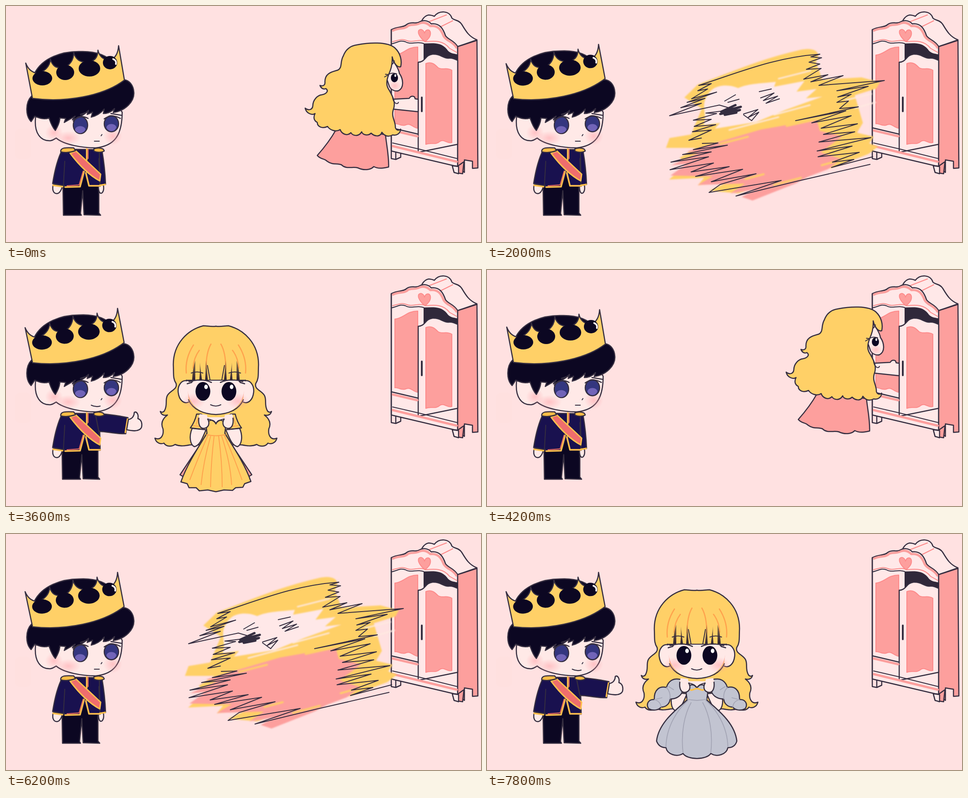
An HTML page that plays this animation: 1059x529 px, repeating every 8000 ms.

```html
<!DOCTYPE html>
<html lang="en">
<head>
<meta charset="utf-8">
<title>Wardrobe change</title>
<style>
html, body { margin: 0; width: 100%; height: 100%; overflow: hidden; background: #ffe1e1 }
svg { display: block; width: 100vw; height: 100vh; fill: none; stroke-linecap: round; stroke-linejoin: round }
.line { stroke: #352e40; stroke-width: 2.5 }
.thin { stroke: #352e40; stroke-width: 2 }
.ink { fill: #0c0722 }
.gold { fill: #ffd067 }
.pink { fill: #fd9f9d }
.skin { fill: #ffe9e7 }
.cream { fill: #ffe8e8 }
.navy { fill: #19114f }
.silver { fill: #c2c4d1 }
.trim { stroke: #fd9f9d; stroke-width: 5 }
.rim { stroke: #fd8a8a; stroke-width: 2 }
.braid { stroke: #ffc04c; stroke-width: 3.5 }
.fold { stroke: #ffa24d; stroke-width: 2 }
.crease { stroke: #a3a4b4; stroke-width: 1.8 }
.blush { fill: url(#blush) }
.soft { filter: blur(1.5px) }
</style>
</head>
<body>
<svg viewBox="0 0 1059 529" preserveAspectRatio="none">
<defs>
  <radialGradient id="blush">
    <stop offset="0" stop-color="#ff9aa2" stop-opacity=".5"/>
    <stop offset="1" stop-color="#ff9aa2" stop-opacity="0"/>
  </radialGradient>
  <linearGradient id="tip" x1="0" y1="0" x2="0" y2="1">
    <stop offset="0" stop-color="#2c2030" stop-opacity=".5"/>
    <stop offset="1" stop-color="#2c2030"/>
  </linearGradient>

  <g id="curls">
    <path class="gold line" d="M468 126C458 128 449 125 440 125C405 134 373 165 373 212C374 235 372 243 379 254C384 268 363 271 359 283C355 294 360 302 354 314C352 319 347 320 344 317C346 325 353 327 360 325C348 334 345 345 350 356C352 368 347 383 332 377C335 389 346 391 352 388C358 397 370 396 377 391C388 396 400 394 410 392L468 392"/>
  </g>
  <g id="arm">
    <path class="skin line" d="M415 355C407 374 411 392 420 396C433 393 438 376 446 358Z"/>
  </g>
  <g id="hand">
    <path class="skin line" d="M430 331C428 347 433 356 442 355C453 353 455 342 449 333"/>
    <path class="skin" d="M429 331L450 334L448 325L432 323Z"/>
  </g>
  <g id="ear">
    <path class="skin line" d="M406 249C391 244 382 260 384 275C386 292 397 301 407 296"/>
    <path stroke="#fb9a94" stroke-width="2" d="M407 262Q405 277 410 290"/>
  </g>
  <g id="goldSleeve">
    <path class="gold line" d="M425 323C422 336 417 346 411 354L438 357L446 330L435 323Z"/>
    <path class="fold" d="M418 349L438 351M429 330L424 346"/>
  </g>
  <g id="puff">
    <path class="silver line" d="M431 326C415 322 404 330 400 344C385 340 372 349 373 371C360 370 354 381 360 391C371 398 384 394 388 388C401 388 408 378 408 370C425 370 435 360 436 350Z"/>
    <path class="crease" d="M400 344Q410 354 408 370M373 371Q387 375 388 388M405 342L416 349M378 370L390 367"/>
  </g>
  <g id="eye">
    <ellipse class="blush" cx="419" cy="294" rx="25" ry="18"/>
    <ellipse class="ink" cx="439" cy="272" rx="16.5" ry="21"/>
    <path class="line" d="M408 250Q437 242 458 252M402 247L416 250M404 255L414 252"/>
  </g>
  <g id="bangs">
    <path stroke="#ffa24d" stroke-width="2.6" d="M418 168C404 190 400 212 402 231M431 180C422 192 418 205 417 220M457 166C450 178 446 197 446 222"/>
    <path fill="url(#tip)" d="M415 247Q416 220 422 203L422 247ZM431 247Q433 222 432 207L437 247ZM444 247L446 203L450 247Z"/>
    <path class="thin" d="M413 231Q426 226 439 231M455 247L449 214"/>
  </g>
</defs>

<rect width="1059" height="529" fill="#ffe1e1"/>
<rect x="20" y="275" width="36" height="68" rx="12" fill="#ffdcd9" opacity=".35"/>

<g id="wardrobe">
  <path class="cream line" d="M928 31C938 16 947 20 955 23C966 9 989 10 994 27C999 33 1009 30 1016 41C1026 58 1033 69 1050 76L1007 91L925 40Z"/>
  <path class="rim" d="M941 36L982 20M968 47L996 33"/>
  <path class="cream line" d="M859 53C874 45 886 49 894 41C903 34 913 41 921 36C931 30 942 33 948 40C966 38 974 49 980 67C986 76 998 76 1007 91V360L859 325Z"/>
  <path class="trim" d="M863 55C875 48 889 53 897 44C907 40 914 44 922 39C932 35 940 39 946 45C963 43 970 53 976 68C984 80 996 79 1004 93"/>
  <path class="pink line" d="M1007 91L1050 77L1052 363L1040 364V348L1022 345V373L1007 361Z"/>
  <path class="pink rim" d="M867 110C887 108 893 92 918 92V274C906 272 902 261 890 267C879 270 874 262 867 264Z"/>
  <path class="thin" d="M859 85C874 82 878 76 890 80C902 88 916 78 931 84"/>
  <path fill="#30283a" d="M931 84C950 84 969 80 983 97C990 108 1000 106 1007 109V124H931Z"/>
  <path class="rim" d="M862 80C875 77 881 73 892 77C905 84 921 72 936 80C957 78 975 77 989 95L1005 104"/>
  <path class="cream line" d="M919 126C935 126 934 110 951 108C969 107 973 117 986 117C995 116 1001 119 1007 122V310L919 328Z"/>
  <path class="pink rim" d="M936 129C949 124 956 131 963 138C973 145 981 136 994 144V306C982 309 978 298 968 303C957 313 948 305 936 310Z"/>
  <path stroke="#352e40" stroke-width="4" d="M927 205V236"/>
  <path class="line" d="M859 273L918 287"/>
  <path class="trim" d="M862 279L917 292M862 314L1005 349"/>
  <path class="thin" d="M862 307L918 320L938 325M938 325L1006 342"/>
  <path class="line" d="M859 53V342L869 344V328M880 331V339L869 344"/>
  <path class="pink line" d="M995 358L999 373L1018 376L1021 349L1007 359Z"/>
  <path class="cream line" d="M995 358L999 373L1009 376V360Z"/>
  <path class="pink rim" d="M934 80C925 73 917 62 920 55C925 49 932 55 933 61C936 51 944 52 946 58C948 67 941 75 934 80Z"/>
</g>

<g id="peek">
  <path class="pink line" d="M736 277C722 302 709 318 694 335C701 344 709 341 716 348C728 357 739 352 748 356C759 367 774 359 785 363C798 369 812 368 820 360C831 366 844 363 853 361C854 336 848 310 846 288Z"/>
  <path id="reachLow" class="skin line" d="M862 209L899 207C903 200 912 201 912 208L919 209V237L862 231"/>
  <path id="reachHigh" class="skin line" d="M864 205C882 198 896 195 896 184C899 178 905 183 908 182Q914 178 919 184V212L865 236"/>
  <path class="skin line" d="M858 115C868 130 876 142 877 151C886 164 888 183 875 190C867 192 859 188 855 181L845 152Z"/>
  <ellipse class="blush" cx="867" cy="179" rx="14" ry="12"/>
  <path class="gold line" d="M783 87C808 82 850 79 867 94C880 106 883 123 880 136C872 139 864 127 861 114C862 133 857 145 853 154C848 168 847 178 854 188C865 207 869 219 863 234C859 250 869 259 868 272C870 279 875 280 880 276C879 286 871 291 862 289C851 295 843 290 838 283C834 295 821 292 814 285C807 292 795 289 793 282C786 294 773 291 769 284C760 293 748 286 745 277C735 284 721 277 717 270C704 276 694 270 694 261C686 257 685 249 689 241C682 246 669 240 667 229C674 235 683 233 684 224C684 210 695 200 704 199C715 197 720 190 713 185C708 188 702 184 700 178C708 181 712 176 711 170C711 151 725 148 739 144C751 139 744 125 752 112C757 98 768 89 783 87Z"/>
  <ellipse class="ink" cx="866" cy="161" rx="8" ry="10"/>
  <ellipse cx="868" cy="156" rx="2" ry="3" fill="#fff"/>
  <path class="thin" d="M844 159L851 155Q859 148 871 152M846 153L853 154M862 130L866 123M862 205C863 216 872 223 875 216"/>
</g>

<g id="blur">
  <g class="soft">
    <path class="gold" d="M470 176C550 145 620 116 700 98C738 91 745 109 733 126L748 165L835 160L876 171L868 185L820 200L838 262L825 284L862 293L852 308L872 315L850 332L772 362L660 388L560 420L495 414L535 396L470 402L484 385L406 389L445 355L430 340L465 318L399 318L407 296L455 288L479 230L440 205Z"/>
    <path class="pink" d="M446 326L515 305L610 277L735 255L742 280L792 292L744 328L790 343L760 366L715 383L690 397L592 436L568 428L600 411L543 420L575 398L470 401L503 382L409 380L445 354L411 357L470 330Z"/>
    <path class="cream" d="M490 203C505 170 545 177 560 184C582 174 605 174 644 170L640 181L708 168L690 192L735 186L711 207L748 203L665 233L600 260L508 275L520 262L483 267C492 243 476 225 490 203Z"/>
    <path stroke="#ffe9e0" stroke-width="3" d="M540 278L650 249M640 244L720 222M650 163L721 145M800 211L857 197M820 229L866 216"/>
    <path stroke="#ffd067" stroke-width="4" d="M520 309L582 293M576 388L617 377M668 269L731 255M640 401L700 385M746 357L782 347"/>
  </g>
  <path class="thin" d="M742 108C640 115 560 150 472 178L500 174L470 190L492 186L456 208L512 193L446 216L486 207L432 228L478 218L407 246L518 222L552 232L488 240L512 241L460 256L500 254L462 270L510 266L458 282L500 278L450 301L478 296"/>
  <path class="thin" d="M742 108L722 114L746 116L718 126L742 130L712 142L745 140L706 164L760 154L722 170L794 156L740 178L886 167L780 190L850 180L782 204L812 198L780 216L806 213L786 230L828 226L688 257L800 235L724 262L812 246L745 274L826 264L750 288L820 282L740 305L856 295L736 325L814 314L738 338L830 328L770 350L818 344L768 362L860 338"/>
  <path class="thin" d="M480 308L515 307L460 322L536 312L436 333L500 327L410 350L494 338L408 367L505 352L455 372L540 360L465 382L570 366L500 394L600 376L520 400L495 418L656 391L555 426L690 393L854 355"/>
  <path class="thin" d="M607 192L634 186M610 206L640 195L616 212L648 202L622 218L652 208M572 242L604 232L582 250L606 238L590 257L572 244M530 213L554 199M537 216L562 209"/>
  <path stroke="#352e40" stroke-width="5" d="M554 222L522 237L566 226L520 242L564 233L530 244L556 239"/>
</g>

<g id="princess">
  <use href="#curls"/>
  <use href="#curls" transform="matrix(-1 0 0 1 936 0)"/>
  <path class="gold" d="M462 128H474V394H462Z"/>
  <path class="skin" d="M443 330H493V360H443Z"/>
  <use href="#arm"/>
  <use href="#arm" transform="matrix(-1 0 0 1 936 0)"/>
  <g id="goldDress">
    <path class="pink line" d="M445 373L388 459L402 467L468 400L534 467L548 459L491 373Z"/>
    <path class="gold line" d="M446 346C451 335 463 333 468 345C473 333 485 335 490 346L488 366C507 397 533 436 546 474L532 479L528 487L512 488L505 494L486 493L468 497L450 493L431 495L424 488L408 488L404 479L390 475C403 437 429 397 448 366Z"/>
    <path class="fold" d="M450 371Q427 424 410 470M456 373Q440 430 435 481M464 372Q457 430 456 486M474 372Q482 430 482 486M481 373Q500 430 503 481M487 371Q510 424 526 470M447 369Q468 374 489 369"/>
    <use href="#goldSleeve"/>
    <use href="#goldSleeve" transform="matrix(-1 0 0 1 936 0)"/>
  </g>
  <g id="silverDress">
    <path class="silver line" d="M447 345C452 335 463 336 468 346C473 336 484 335 489 345L492 356L490 372C510 391 552 421 557 464C554 475 546 479 537 479C534 494 513 501 499 492C489 507 447 507 437 492C423 501 402 494 399 479C390 479 382 475 378 464C383 421 426 391 446 372L444 356Z"/>
    <path class="braid" d="M447 347L456 350L468 346L480 350L489 347"/>
    <path class="crease" d="M448 373C426 392 400 430 399 477M455 378C440 405 432 445 437 490M481 378C496 405 504 445 499 490M488 373C510 392 536 430 537 477M446 370Q468 376 490 370"/>
    <use href="#puff"/>
    <use href="#puff" transform="matrix(-1 0 0 1 936 0)"/>
  </g>
  <use href="#hand"/>
  <use href="#hand" transform="matrix(-1 0 0 1 936 0)"/>
  <path class="thin" d="M450 334Q462 336 468 344Q474 336 486 334"/>
  <use href="#ear"/>
  <use href="#ear" transform="matrix(-1 0 0 1 936 0)"/>
  <path class="skin" d="M404 246H532C535 292 514 322 468 324C422 322 401 292 404 246Z"/>
  <path class="line" d="M407 291C417 314 442 323 468 324C494 323 519 314 529 291"/>
  <path class="gold" d="M400 247C398 205 420 165 468 160C516 165 538 205 536 247Z"/>
  <use href="#bangs"/>
  <use href="#bangs" transform="matrix(-1 0 0 1 936 0)"/>
  <path class="thin" d="M404 247H532"/>
  <use href="#eye"/>
  <use href="#eye" transform="matrix(-1 0 0 1 936 0)"/>
  <g fill="#fff">
    <ellipse cx="446" cy="262" rx="4" ry="5"/>
    <ellipse cx="503" cy="262" rx="4" ry="5"/>
  </g>
  <path class="thin" d="M456 302Q468 308 479 302"/>
</g>

<g id="prince">
  <path id="legs" class="ink line" d="M127 403L128 469H168L166 465L171 414L174 468L211 469L207 464V403Z"/>
  <path class="skin line" d="M105 401C102 416 108 422 116 420C122 417 125 407 126 402Z"/>
  <path id="restHand" class="skin line" d="M206 402C206 416 209 422 214 419C219 414 218 405 217 401Z"/>
  <path id="restArm" class="navy line" d="M203 322L214 324C218 347 221 372 222 400L206 403Z"/>
  <path class="navy line" d="M126 321C115 342 108 372 104 398L131 403L130 406L167 405L176 384L184 404L210 404L208 322Z"/>
  <path class="ink" d="M167 405L176 380L185 405Z"/>
  <path class="thin" d="M131 348L128 402M207 342L209 400"/>
  <path class="braid" d="M105 402L126 405M132 406L165 405L174 371M178 374L185 403L210 403M180 320V345"/>
  <path stroke="#ef6d60" stroke-width="2" d="M136 403L163 401L172 370M183 321V342"/>
  <g id="thumb">
    <path class="navy line" d="M199 321C225 323 249 326 272 331L267 367C241 368 222 361 207 362Z"/>
    <path class="braid" d="M271 334L266 364"/>
    <path class="skin line" d="M273 335C282 334 286 326 286 319C292 316 296 325 294 333C303 336 304 346 302 353C297 363 282 361 269 358Z"/>
  </g>
  <path id="cuff" class="braid" d="M209 402L221 400"/>
  <path fill="#ef6d6d" stroke="#ffc04c" stroke-width="3" d="M143 330L156 325L211 377L209 392C183 378 161 354 143 330Z"/>
  <path class="line" fill="#ffbd48" d="M122 327C121 317 133 317 151 318L155 324C143 329 132 329 122 327ZM196 320C206 317 218 318 219 325C213 329 201 328 196 325Z"/>

  <path class="skin line" d="M66 249C62 285 77 303 99 302C106 301 109 297 112 296C129 311 170 318 200 318C240 314 259 292 259 238L240 210L90 215Z"/>
  <ellipse class="blush" cx="107" cy="284" rx="20" ry="18"/>
  <ellipse class="blush" cx="139" cy="296" rx="28" ry="16"/>
  <ellipse class="blush" cx="238" cy="292" rx="21" ry="20"/>
  <path class="ink line" d="M57 202C43 216 43 246 56 259L64 247C76 252 85 255 96 251Q102 270 110 279C116 269 120 259 120 251L133 252L130 261L154 247L148 255C163 251 176 242 184 234L181 243L193 238L190 249C205 246 213 238 219 231L217 241C227 241 236 236 242 230L239 239C266 235 287 214 285 193C284 177 275 167 263 165Z"/>
  <g class="line" fill="#34367f">
    <ellipse cx="166" cy="267" rx="16" ry="19"/>
    <ellipse cx="235" cy="264" rx="16" ry="18"/>
  </g>
  <path fill="#7164b8" d="M154 278A11 8 0 0 1 177 277C173 287 159 288 154 278M224 273A11 8 0 0 1 246 272C243 282 230 284 224 273"/>
  <path class="line" d="M150 258Q164 242 183 252M219 253Q235 241 255 252M166 243L184 237M234 241L257 245"/>
  <path class="thin" d="M212 291L214 288"/>
  <path id="mouthRest" class="thin" d="M197 303L208 303"/>
  <path id="mouthSmile" class="thin" d="M190 303Q200 308 210 305"/>

  <g id="crown">
    <path class="cream" d="M56 148L85 125L100 142L225 126L246 110L248 130Z"/>
    <path class="ink line" d="M64 150C82 116 125 101 166 102C199 101 225 110 241 129L190 150L100 160Z"/>
    <path class="gold line" d="M44 128C49 141 58 149 70 151C87 147 98 135 99 119C103 134 111 140 126 138C143 135 151 120 151 104C155 120 165 127 182 126C199 124 205 113 205 99C208 113 216 120 230 122C243 119 250 106 251 89L264 166C217 202 132 217 59 207Z"/>
    <g class="ink">
      <ellipse cx="81" cy="162" rx="22" ry="16"/>
      <ellipse cx="132" cy="149" rx="20" ry="17"/>
      <ellipse cx="186" cy="140" rx="24" ry="18"/>
      <ellipse cx="232" cy="127" rx="16" ry="15"/>
    </g>
    <path stroke="#fff4ef" stroke-width="4" d="M239 119Q247 122 245 130"/>
  </g>
</g>
</svg>
<script>
const $ = id => document.getElementById(id);
const show = (id, on) => { $(id).style.display = on ? "" : "none"; };
const move = (id, value) => $(id).setAttribute("transform", value);
const LOOP = 8000, ACT = 4200, PEEK_END = 2000, POSE_START = 2100, POSE_END = 4100;
const start = performance.now();
let last = "";

function draw(time) {
  const t = time % LOOP, u = t % ACT;
  const peek = u < PEEK_END;
  const pose = u >= POSE_START && u < POSE_END;
  const blur = !peek && !pose;
  const reach = peek && Math.floor(u / 250) % 2 === 1;
  const beat = blur || Math.floor((pose ? u - POSE_START : u) / 500) % 2 === 1;
  const gold = t < ACT;

  const state = [peek, pose, reach, beat, gold].join();
  if (state === last) return;
  last = state;

  show("peek", peek);
  show("reachLow", !reach);
  show("reachHigh", reach);
  show("blur", blur);
  show("princess", pose);
  show("goldDress", gold);
  show("silverDress", !gold);
  for (const id of ["restHand", "restArm", "cuff", "mouthRest"]) show(id, !pose);
  show("thumb", pose);
  show("mouthSmile", pose);
  move("peek", reach ? "translate(.8 .4)" : "");
  move("legs", beat ? "translate(-2 0)" : "");
  move("crown", beat ? "translate(-1 -1) rotate(-1.2 150 150)" : "");
  move("princess", beat ? "" : "translate(0 5) scale(1 .99)");
}

function tick() {
  draw(performance.now() - start);
  requestAnimationFrame(tick);
}
tick();
</script>
</body>
</html>
```
